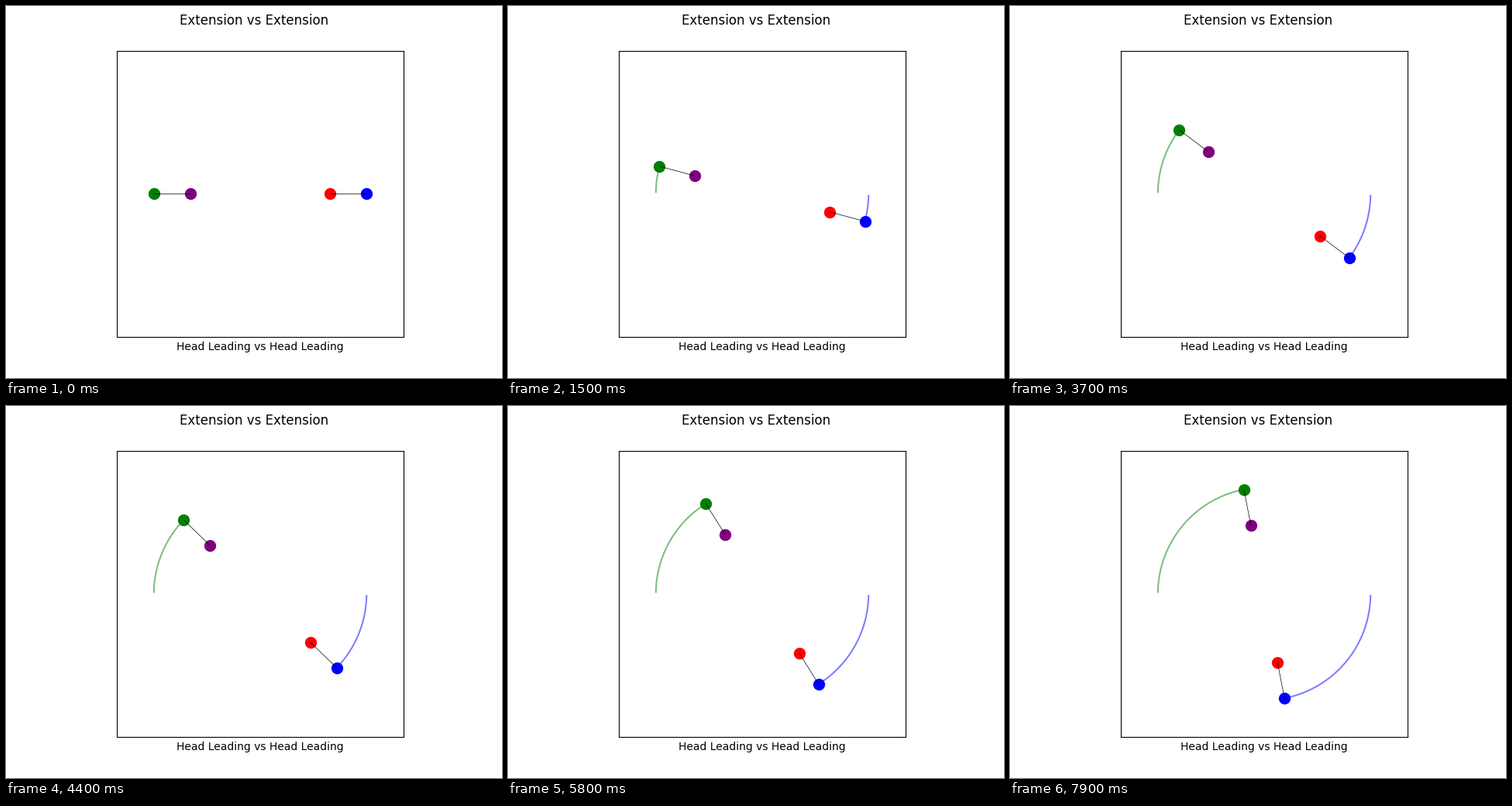
Recreate the animation shown at these times as a matplotlib script. Size 640 by 480 pixels, loop 8 s.

```python
import numpy as np
import matplotlib.pyplot as plt
from matplotlib.animation import FuncAnimation

FRAMES = 80
HALF = 184.8            # half the axes side in pixels, so data units are pixels
OUTER, INNER = 137.2, 90.2

fig, ax = plt.subplots(figsize=(6.4, 4.8), dpi=100)
fig.suptitle("Extension vs Extension")
ax.set(xlim=(-HALF, HALF), ylim=(-HALF, HALF), aspect="equal",
       xticks=[], yticks=[], xlabel="Head Leading vs Head Leading")


def polar(radius, degrees):
    a = np.radians(degrees)
    return radius * np.cos(a), radius * np.sin(a)


class Rod:
    """Two beads joined by a thin line; the outer one leaves a trail."""

    def __init__(self, start, head, tail):
        self.start = start
        self.trail, = ax.plot([], [], color=head, alpha=0.5, lw=1.5)
        self.head, = ax.plot([], [], "o", color=head, ms=10)
        self.tail, = ax.plot([], [], "o", color=tail, ms=10)
        self.link, = ax.plot([], [], color="black", lw=0.5)

    def turn(self, step):
        angle = self.start - step
        hx, hy = polar(OUTER, angle)
        tx, ty = polar(INNER, angle)
        self.head.set_data([hx], [hy])
        self.tail.set_data([tx], [ty])
        self.link.set_data([tx, hx], [ty, hy])
        self.trail.set_data(*polar(OUTER, self.start - np.arange(1, step + 1)))
        return self.trail, self.head, self.tail, self.link


rods = [Rod(0, "blue", "red"), Rod(180, "green", "purple")]


def update(step):
    return [artist for rod in rods for artist in rod.turn(step)]


anim = FuncAnimation(fig, update, frames=FRAMES, interval=100,
                     repeat=True, repeat_delay=0)
plt.show()
```
